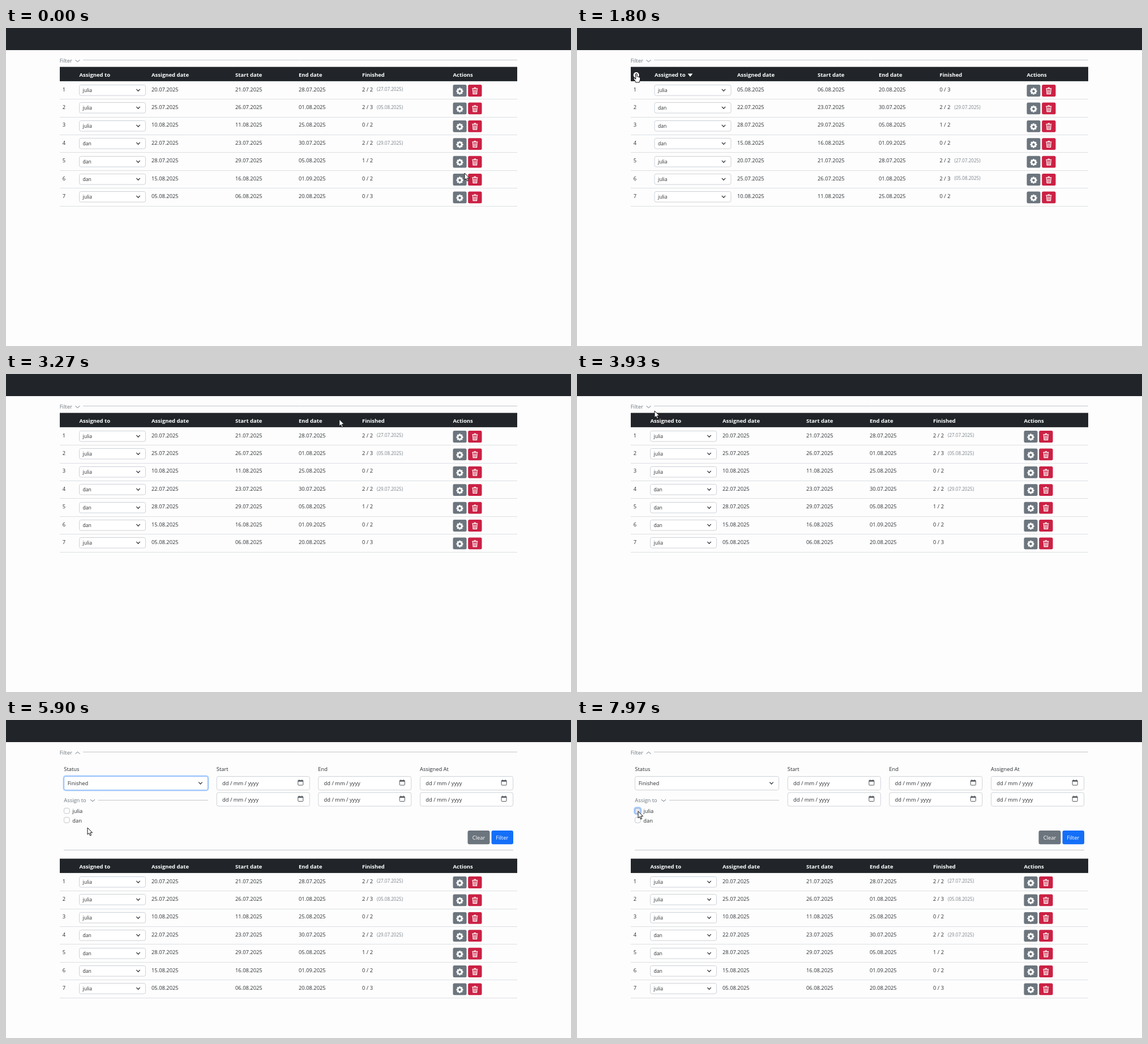
Animation, 998 px wide and 561 px high, one loop 8000 ms. Source, as an HTML page with a canvas:

```html
<!DOCTYPE html>
<html lang="en">
<head>
<meta charset="utf-8">
<style>
html, body { margin: 0; width: 100%; height: 100%; overflow: hidden; background: #fdfdfd; }
canvas { display: block; }
</style>
</head>
<body>
<canvas id="stage" width="998" height="561"></canvas>
<script>
const ctx = document.getElementById('stage').getContext('2d');
const LOOP = 8000;
const DARK = '#212529', GREY = '#6c757d', RED = '#cb2144', BLUE = '#146ff8', BORDER = '#cdd2d8', INK = '#2b2f33';
const ROW = 31.4, PANEL = 176;

const rows = [
  ['julia', '20.07.2025', '21.07.2025', '28.07.2025', '2 / 2', '(27.07.2025)'],
  ['julia', '25.07.2025', '26.07.2025', '01.08.2025', '2 / 3', '(05.08.2025)'],
  ['julia', '10.08.2025', '11.08.2025', '25.08.2025', '0 / 2'],
  ['dan', '22.07.2025', '23.07.2025', '30.07.2025', '2 / 2', '(29.07.2025)'],
  ['dan', '28.07.2025', '29.07.2025', '05.08.2025', '1 / 2'],
  ['dan', '15.08.2025', '16.08.2025', '01.09.2025', '0 / 2'],
  ['julia', '05.08.2025', '06.08.2025', '20.08.2025', '0 / 3']
];
const sortedOrder = [6, 3, 4, 5, 0, 1, 2];
const headings = ['Assigned to', 'Assigned date', 'Start date', 'End date', 'Finished', 'Actions'];
const plainCols = [129.5, 257, 405, 517, 629, 789.5];
const sortedCols = [137, 283, 425, 533, 640.5, 794.5];

// Pointer path: time, x, y
const path = [
  [0, 810, 256], [680, 174, 80], [1030, 170, 80], [1450, 170, 80], [1760, 105, 80],
  [1900, 105, 80], [2570, 488, 80], [3000, 600, 80], [3250, 590, 80], [3930, 137, 65],
  [4160, 121, 56], [4560, 121, 56], [4830, 118, 159], [5150, 200, 112], [5350, 200, 114],
  [5700, 150, 150], [5900, 144, 190], [6170, 140, 186], [7220, 140, 186], [7570, 108, 161], [LOOP, 108, 161]
];

const clamp = v => Math.max(0, Math.min(1, v));
const ease = v => v * v * (3 - 2 * v);
const between = (t, a, b) => t >= a && t < b;

function text(str, x, y, size = 9.35, color = INK, weight = 400) {
  ctx.font = `${weight} ${size}px "Open Sans", "Noto Sans", sans-serif`;
  ctx.fillStyle = color;
  ctx.fillText(str, x, y);
}

function box(x, y, w, h, r, fill, stroke, width = 1) {
  ctx.beginPath();
  ctx.roundRect(x, y, w, h, r);
  if (fill) { ctx.fillStyle = fill; ctx.fill(); }
  if (stroke) { ctx.strokeStyle = stroke; ctx.lineWidth = width; ctx.stroke(); }
}

function poly(points, color, width = 1) {
  ctx.beginPath();
  points.forEach(([x, y]) => ctx.lineTo(x, y));
  ctx.strokeStyle = color;
  ctx.lineWidth = width;
  ctx.stroke();
}

const rule = (x1, x2, y, color) => poly([[x1, y], [x2, y]], color);

function chevron(x, y, color, width, dir = 1, half = 3.2) {
  poly([[x - half, y - 1.7 * dir], [x, y + 1.7 * dir], [x + half, y - 1.7 * dir]], color, width);
}

function select(x, y, w, h, label, size, pad, ring = 0) {
  if (ring) box(x, y, w, h, 3, null, `rgba(134,183,254,${0.6 * ring})`, 4);
  box(x, y, w, h, 3, '#fff', ring > 0.5 ? '#86b7fe' : BORDER);
  text(label, x + pad, y + h / 2 + size * 0.41, size);
  chevron(x + w - 13, y + h / 2 - 0.2, '#343a40', 1.3);
}

function gear(x, y) {
  ctx.save();
  ctx.translate(x, y);
  ctx.fillStyle = '#fff';
  for (let i = 0; i < 8; i++) {
    ctx.rotate(Math.PI / 4);
    ctx.fillRect(-1.4, -6, 2.8, 3);
  }
  ctx.beginPath();
  ctx.arc(0, 0, 3.5, 0, 7);
  ctx.strokeStyle = '#fff';
  ctx.lineWidth = 2.5;
  ctx.stroke();
  ctx.restore();
}

function trash(x, y) {
  poly([[x - 5, y - 4], [x + 5, y - 4]], '#fff', 1.4);
  poly([[x - 1.7, y - 5.5], [x + 1.7, y - 5.5]], '#fff', 1.2);
  poly([[x - 3.9, y - 3], [x - 3.2, y + 5.4], [x + 3.2, y + 5.4], [x + 3.9, y - 3]], '#fff', 1.2);
  [-1.7, 0, 1.7].forEach(d => poly([[x + d, y - 2], [x + d, y + 4.5]], '#fff', 0.9));
}

function drawTable(top, sorted) {
  const cols = sorted ? sortedCols : plainCols;
  ctx.fillStyle = DARK;
  ctx.fillRect(95, top, 808, 25.3);
  headings.forEach((h, i) => text(h, cols[i], top + 17.3, 9.5, '#fff', 700));
  if (sorted) {
    ctx.fillStyle = '#fff';
    ctx.beginPath();
    ctx.arc(104.7, top + 14.5, 5, 0, 7);
    ctx.fill();
    poly([[102.8, top + 12.6], [106.6, top + 16.4]], DARK, 1.3);
    poly([[106.6, top + 12.6], [102.8, top + 16.4]], DARK, 1.3);
    ctx.beginPath();
    ctx.moveTo(195.7, top + 11.8);
    ctx.lineTo(204.3, top + 11.8);
    ctx.lineTo(200, top + 17.4);
    ctx.fill();
  }
  rows.forEach((_, i) => {
    const [name, ...cells] = rows[sorted ? sortedOrder[i] : i];
    const y = top + 25.3 + ROW * i, base = y + 17.6;
    rule(95, 903, Math.round(y + ROW) + 0.5, '#dcdfe3');
    text(i + 1, 99.7, base);
    select(cols[0], Math.round(y + 6) + 0.5, sorted ? 135 : 117, 18.5, name, 8.6, 6);
    cells.slice(0, 4).forEach((c, k) => text(c, cols[k + 1], base));
    if (cells[4]) text(cells[4], cols[4] + 26, base - 0.2, 8.1, '#7b838a');
    const bx = cols[5];
    box(bx, y + 6.2, 24, 20.8, 2.5, GREY);
    box(bx + 26.7, y + 6.2, 24.3, 20.8, 2.5, RED);
    gear(bx + 12, y + 17.5);
    trash(bx + 38.8, y + 17);
  });
}

function dateInput(x, y) {
  box(x, y, 164, 24, 3, '#fff', BORDER);
  text('dd / mm / yyyy', x + 9.7, y + 15.9);
  const cx = x + 143.5, cy = y + 7;
  box(cx, cy, 9, 8.5, 1, null, '#555a5f');
  ctx.fillStyle = '#555a5f';
  ctx.fillRect(cx, cy, 9, 2.2);
  ctx.fillRect(cx + 1.5, cy - 1.5, 1, 2);
  ctx.fillRect(cx + 6.5, cy - 1.5, 1, 2);
}

function checkbox(y, label, ring = 0) {
  if (ring) box(102.5, y, 9.5, 9.5, 2.5, null, `rgba(134,183,254,${0.6 * ring})`, 5);
  box(102.5, y, 9.5, 9.5, 2.5, ring ? '#e3e5e8' : '#fff', ring ? '#78a5e6' : '#bfc5cb');
  text(label, 117.3, y + 8.8);
}

function drawPanel(t, open) {
  const press = clamp((t - 7850) / 110);
  const focus = clamp((t - 5180) / 130) * (1 - press);
  ctx.save();
  ctx.beginPath();
  ctx.rect(90, 66, 820, PANEL * open);
  ctx.clip();
  text('Status', 102.3, 90.3);
  select(102.5, 99.5, 254, 24, t < 5720 ? 'All' : 'Finished', 9.35, 6.3, focus);
  text('Assign to', 102.3, 144.8, 9.35, GREY);
  chevron(153, 142, GREY, 1, 1, 4);
  rule(163, 357, 141.5, '#c4c7ca');
  checkbox(155.5, 'julia', press);
  checkbox(171.8, 'dan');
  [['Start', 372], ['End', 551.5], ['Assigned At', 731.3]].forEach(([label, x]) => {
    text(label, x - 0.2, 90.3);
    dateInput(x + 0.3, 99.5);
    dateInput(x + 0.3, 128);
  });
  box(815.5, 195, 39, 24.3, 3, GREY);
  box(857.5, 195, 38.5, 24.3, 3, BLUE);
  text('Clear', 823.8, 211.3, 9.35, '#fff');
  text('Filter', 865.3, 211.3, 9.35, '#fff');
  rule(102, 896, 229.5, '#c4c7ca');
  ctx.restore();
}

function pointerAt(t) {
  const i = path.findIndex(p => p[0] > t);
  const [t0, x0, y0] = path[i - 1], [t1, x1, y1] = path[i];
  const k = ease((t - t0) / (t1 - t0));
  return [x0 + (x1 - x0) * k, y0 + (y1 - y0) * k];
}

function drawPointer(t) {
  const hand = between(t, 620, 1880) || between(t, 4100, 4600);
  const [x, y] = pointerAt(t);
  const arrow = 'M0 0V12L2.7 9.5L4.6 14L6.6 13.1L4.7 8.8H8.6Z';
  const palm = 'M-1.2 1Q0 -.6 1.2 1V6Q2.3 5.2 3.2 6.4Q4.4 5.8 5.1 7Q6.5 6.7 6.6 8.4V11Q6.4 13 5.2 14V16H-1.4V14.5L-5 9.8Q-5 7.9-3.2 8.5L-1.2 10.3Z';
  ctx.save();
  ctx.translate(x, y);
  const shape = new Path2D(hand ? palm : arrow);
  ctx.lineJoin = 'round';
  ctx.strokeStyle = '#111';
  ctx.lineWidth = 1;
  ctx.fillStyle = '#fff';
  ctx.fill(shape);
  ctx.stroke(shape);
  ctx.restore();
}

function draw(t) {
  const open = ease(clamp((t - 4185) / 190));
  ctx.fillStyle = '#fdfdfd';
  ctx.fillRect(0, 0, 998, 561);
  ctx.fillStyle = DARK;
  ctx.fillRect(0, 0, 998, 39);
  text('Filter', 94.8, 61, 9.35, GREY);
  chevron(126.5, 58, GREY, 1, 1 - 2 * open, 4);
  rule(136, 903, 56.5, '#c4c7ca');
  if (open) drawPanel(t, open);
  drawTable(68.6 + PANEL * open, between(t, 760, 1830));
  drawPointer(t);
}

function tick(now) {
  draw(now % LOOP);
  requestAnimationFrame(tick);
}
draw(0);
requestAnimationFrame(tick);
</script>
</body>
</html>
```
